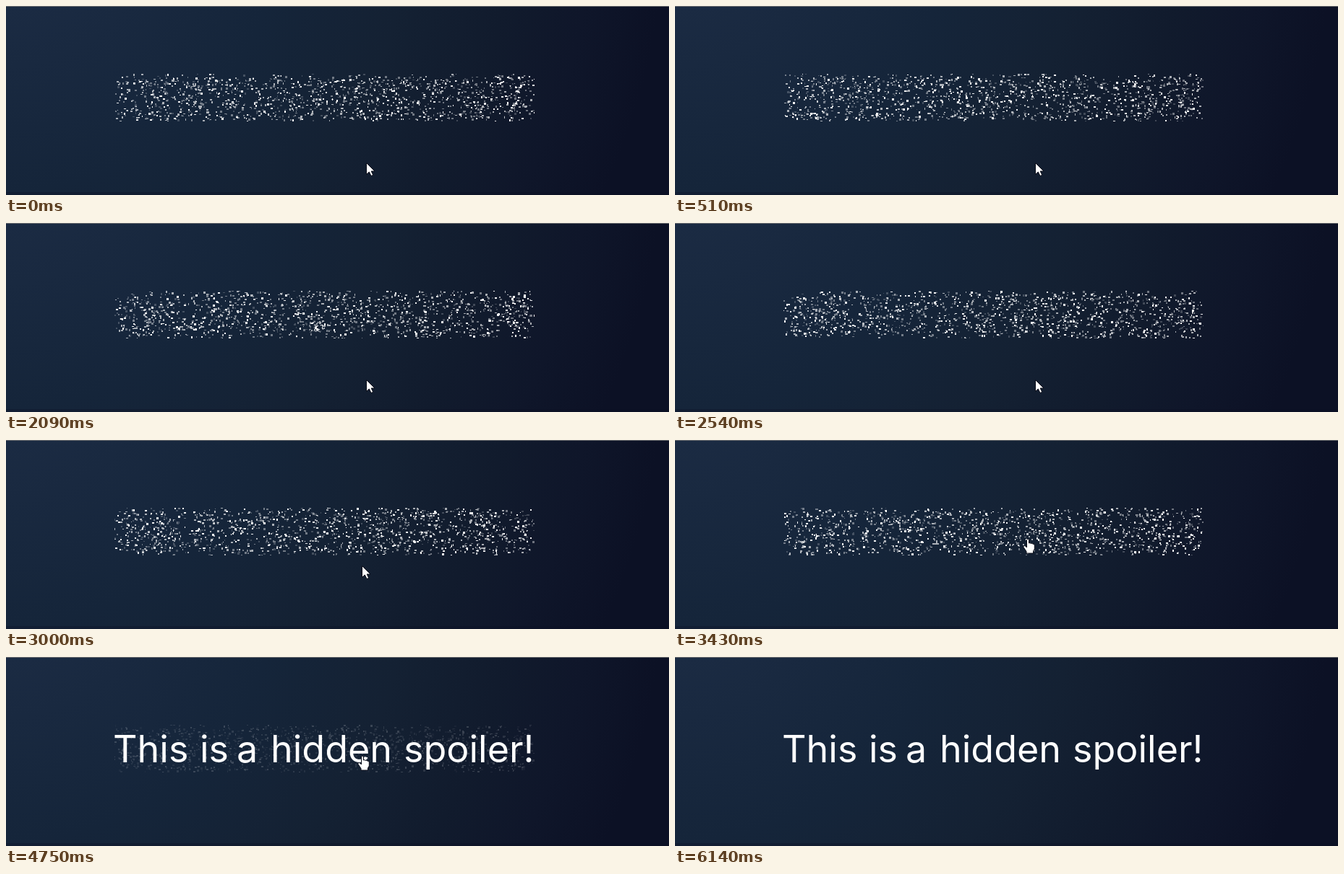
Animation, 917 px wide and 262 px high, one loop 6790 ms. Source, as an HTML page:

```html
<!DOCTYPE html>
<html lang="en">
<head>
<meta charset="utf-8">
<title>Hidden spoiler</title>
<style>
  html, body { margin: 0; width: 100%; height: 100%; overflow: hidden; background: #0c1125; }
  svg { display: block; width: 100%; height: 100%; }
  text { font: 400 52px Inter, "Open Sans", sans-serif; fill: #fff; }
</style>
</head>
<body>
<svg viewBox="0 0 917 262" xmlns="http://www.w3.org/2000/svg">
  <defs>
    <radialGradient id="night" gradientUnits="userSpaceOnUse" cx="0" cy="-125" r="930">
      <stop offset=".13" stop-color="#1b2b43"/>
      <stop offset=".41" stop-color="#15253a"/>
      <stop offset=".6" stop-color="#142133"/>
      <stop offset=".75" stop-color="#111b2d"/>
      <stop offset=".87" stop-color="#0f162a"/>
      <stop offset=".98" stop-color="#0c1125"/>
    </radialGradient>
    <clipPath id="box"><rect x="150" y="94" width="581" height="66"/></clipPath>
  </defs>
  <rect width="917" height="262" fill="url(#night)"/>
  <rect width="917" height="1" fill="#6b6d70"/>
  <rect y="258" width="917" height="4" fill="#0b0f22" opacity=".3"/>
  <g id="message">
    <text x="148" y="146">This</text>
    <text x="268" y="146">is</text>
    <text x="319" y="146">a</text>
    <text x="366" y="146">hidden</text>
    <text x="550" y="146">spoiler!</text>
  </g>
  <g id="dust" fill="#fff" clip-path="url(#box)" shape-rendering="crispEdges"></g>
  <g id="cursor" fill="#fff" stroke="#0a0d18" stroke-width="1" stroke-linejoin="round">
    <path id="arrow" d="M-.5-.5V15.5L3.3 12 6 17.5 8.7 16.3 6.2 11H11Z"/>
    <path id="hand" d="M-1.5 1Q0-1 1.5 1V6Q3 5 4.3 6.5Q6 5.5 7 7.2Q9 6.5 9.3 9V14L7.5 17V20H-2V17.5L-6 11.500Q-6 8.500-3.500 10L-1.500 12Z"/>
  </g>
</svg>
<script>
const LOOP = 6790;
const COUNT = 1500;
const SHADES = [.2, .4, .64, .95];
const BOX = { x: 151, y: 95, w: 577, h: 63 };

// The picture advances in bursts of evenly spaced steps: [start, end, steps].
const BURSTS = [
  [80, 670, 8], [760, 1390, 8], [1480, 2090, 8], [2180, 2820, 8],
  [2910, 3520, 8], [3610, 4210, 8], [4300, 4940, 8], [5870, 6140, 4]
];

// Pointer path: [time, x, y].
const POINTER = [
  [0, 499, 218], [2740, 499, 218], [2820, 498, 210], [2980, 493, 177],
  [3180, 490, 150], [3400, 488, 137], [3960, 488, 137], [4200, 493, 137],
  [5780, 493, 137], [5870, 560, 172], [5960, 655, 212], [6050, 752, 245]
];

const byId = id => document.getElementById(id);
const clamp01 = v => Math.min(1, Math.max(0, v));
const ramp = (t, from, to) => clamp01((t - from) / (to - from));

function hash(a, b) {
  let h = Math.imul(a + 1, 0x9e3779b1) ^ Math.imul(b + 7, 0x85ebca6b);
  h = Math.imul(h ^ (h >>> 15), 0x2c1b3c6d);
  h = Math.imul(h ^ (h >>> 12), 0x297a2d39);
  return ((h ^ (h >>> 15)) >>> 0) / 4294967296;
}

const layers = SHADES.map(opacity => {
  const path = document.createElementNS("http://www.w3.org/2000/svg", "path");
  path.setAttribute("fill-opacity", opacity);
  byId("dust").append(path);
  return path;
});

function stepTime(t) {
  let shown = 0;
  for (const [start, end, steps] of BURSTS) {
    if (t < start) break;
    const gap = (end - start) / (steps - 1);
    shown = start + gap * Math.min(steps - 1, Math.floor((t - start) / gap + .15));
  }
  return shown;
}

function pointerAt(t) {
  const next = POINTER.findIndex(p => p[0] > t);
  if (next < 0) return POINTER.at(-1).slice(1);
  const [t0, x0, y0] = POINTER[next - 1], [t1, x1, y1] = POINTER[next];
  const k = ramp(t, t0, t1);
  return [Math.round(x0 + (x1 - x0) * k), Math.round(y0 + (y1 - y0) * k)];
}

function drawDust(t) {
  const paths = SHADES.map(() => "");
  for (let i = 0; i < COUNT; i++) {
    const life = 600 + 900 * hash(i, 1);
    const age = t / life + hash(i, 2);
    const birth = Math.floor(age), phase = age - birth;
    const rnd = k => hash(i, birth * 10 + k + 20);
    const angle = rnd(1) * Math.PI * 2, travel = (4 + 8 * rnd(2)) * phase;
    const x = Math.round(BOX.x + rnd(3) * BOX.w + Math.cos(angle) * travel);
    const y = Math.round(BOX.y + rnd(4) * BOX.h + Math.sin(angle) * travel);
    const w = rnd(5) < .12 ? 1 : rnd(5) < .6 ? 2 : 3;
    const h = rnd(6) < .15 ? 1 : rnd(6) < .75 ? 2 : 3;
    const light = Math.sin(phase * Math.PI) * (.4 + .6 * rnd(7));
    const shade = Math.min(3, Math.floor(light * 4.4));
    paths[shade] += `M${x} ${y}h${w}v${h}h${-w}z`;
  }
  layers.forEach((layer, i) => layer.setAttribute("d", paths[i]));
}

function render(now) {
  const t = stepTime(now % LOOP);
  const dustAlpha = 1 - ramp(t, 3900, 4930);
  byId("message").setAttribute("opacity", ramp(t, 3800, 4200));
  byId("dust").setAttribute("opacity", dustAlpha);
  if (dustAlpha > 0) drawDust(t);

  const [x, y] = pointerAt(t);
  const hovering = x > 150 && x < 731 && y > 94 && y < 160;
  byId("cursor").setAttribute("transform", `translate(${x} ${y})`);
  byId("cursor").setAttribute("display", t >= 6135 ? "none" : "inline");
  byId("hand").setAttribute("display", hovering ? "inline" : "none");
  byId("arrow").setAttribute("display", hovering ? "none" : "inline");
}

const begin = performance.now();
function tick() {
  render(performance.now() - begin);
  requestAnimationFrame(tick);
}
tick();
</script>
</body>
</html>
```
